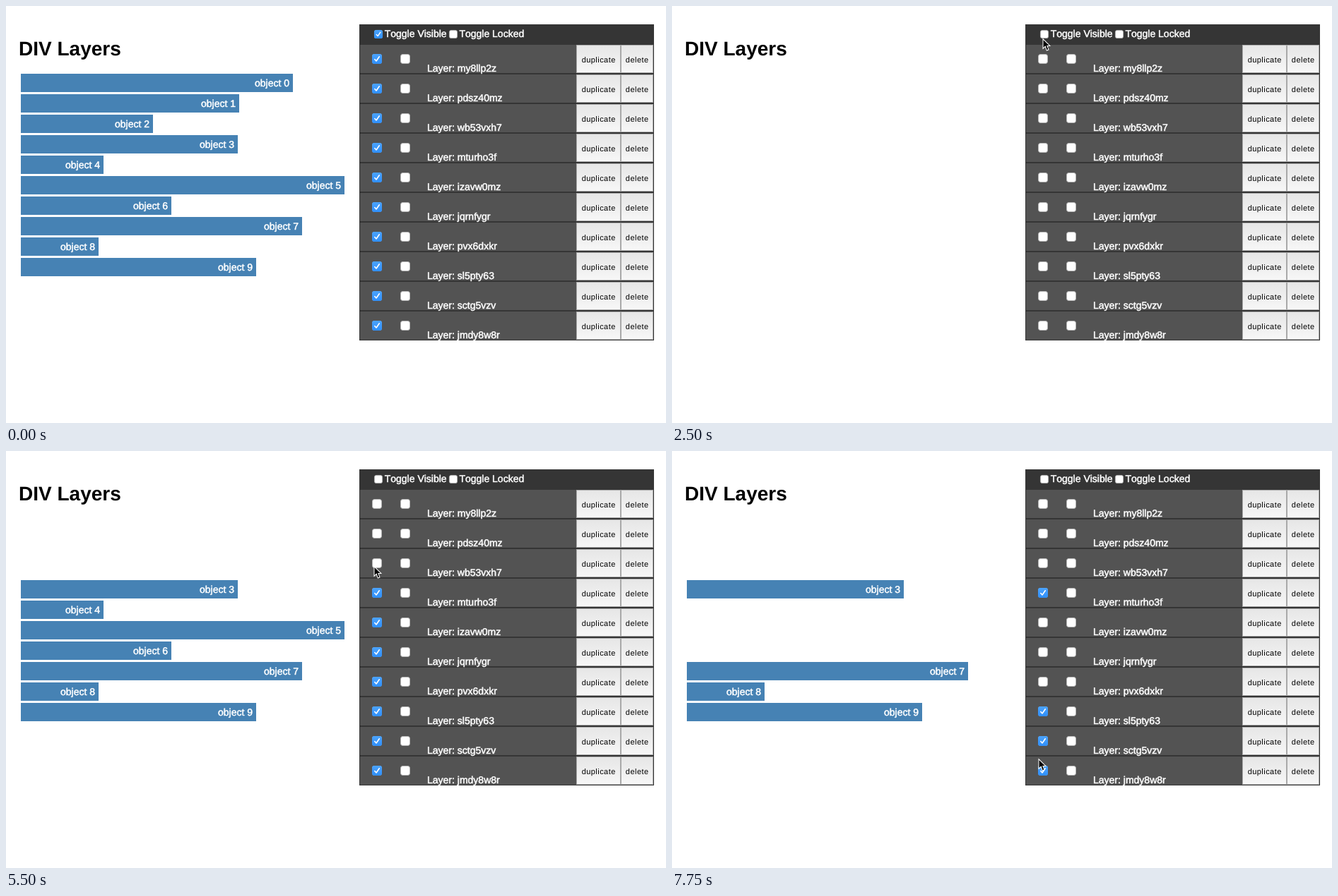
Recreate the animation shown at these times as an HTML page. Size 934 by 591 pixels, loop 8 s.

```html
<!DOCTYPE html>
<html lang="en">
<head>
<meta charset="utf-8">
<title>DIV Layers</title>
<style>
  html, body { margin: 0; width: 100%; height: 100%; overflow: hidden; background: #fff; }
  svg { display: block; }
  text {
    font: 14px "Liberation Sans", Arial, sans-serif;
    font-kerning: none;
    text-rendering: geometricPrecision;
    white-space: pre;
  }
  .title { font-size: 28px; font-weight: bold; }
  .light { fill: #fff; stroke: #fff; stroke-width: .5px; }
  .label { font-size: 11px; letter-spacing: .45px; }
</style>
</head>
<body>
<svg id="stage" width="934" height="591" viewBox="0 0 934 591">
  <defs>
    <linearGradient id="face" x1="0" y1="0" x2="0" y2="1">
      <stop offset="0" stop-color="#e6e6e6"/>
      <stop offset="1" stop-color="#f7f7f7"/>
    </linearGradient>
    <linearGradient id="blue" x1="0" y1="0" x2="0" y2="1">
      <stop offset="0" stop-color="#4ba3fb"/>
      <stop offset="1" stop-color="#2f8ffb"/>
    </linearGradient>
    <linearGradient id="pressed" x1="0" y1="0" x2="0" y2="1">
      <stop offset="0" stop-color="#2083f6"/>
      <stop offset="1" stop-color="#0464e6"/>
    </linearGradient>
  </defs>
</svg>
<script>
const STEP = 250, STEPS = 32;
const layers = ["my8llp2z", "pdsz40mz", "wb53vxh7", "mturho3f", "izavw0mz",
  "jqrnfygr", "pvx6dxkr", "sl5pty63", "sctg5vzv", "jmdy8w8r"];
const barEnds = [406, 330, 208, 328, 138, 479, 234, 419, 131, 354];

// all times below are in steps
const blankFrom = 10, blankTo = 14, pressAt = 20;
const offAt = { 0: 21, 1: 21, 2: 22, 4: 25, 5: 26, 6: 28 };

// pointer strokes: start, end, first point, last point; it rests between them
const strokes = [
  [1, 2, [520, 440], [422, 470]],
  [5, 7, [478, 287], [531, 54]],
  [8, 9, [525, 45], [524, 45]],
  [15, 17, [524, 47], [519, 79]],
  [20, 22, [519, 94], [520, 162]],
  [23, 25, [502, 173], [519, 244]],
  [26, 29, [522, 276], [522, 320]],
  [31, 32, [518, 435], [518, 435]]
];

const stage = document.getElementById("stage");

function add(tag, attrs, parent = stage) {
  const el = document.createElementNS("http://www.w3.org/2000/svg", tag);
  for (const key in attrs) el.setAttribute(key, attrs[key]);
  return parent.appendChild(el);
}

function rect(x, y, width, height, fill, parent) {
  return add("rect", { x, y, width, height, fill }, parent);
}

function write(str, x, y, cls, anchor = "start", parent = stage) {
  const el = add("text", { x, y, class: cls, "text-anchor": anchor }, parent);
  el.textContent = str;
}

function checkbox(cx, cy, size) {
  const g = add("g", { transform: `translate(${cx} ${cy}) scale(${size / 14})` });
  add("rect", { x: -6.5, y: -6.5, width: 13, height: 13, rx: 3,
    fill: "#fff", stroke: "#b4b4b4" }, g);
  const on = add("g", { visibility: "hidden" }, g);
  const face = add("rect", { x: -7, y: -7, width: 14, height: 14, rx: 3,
    fill: "url(#blue)" }, on);
  add("path", { d: "M-3.2 .5L-1 3L3.3 -3.2", fill: "none", stroke: "#fff",
    "stroke-width": 1.6, "stroke-linecap": "round", "stroke-linejoin": "round" }, on);
  return { on, face };
}

function button(str, x, y, width) {
  add("rect", { x: x + .5, y: y + .5, width: width - 1, height: 39,
    fill: "url(#face)", stroke: "#a9a9a9" });
  write(str, x + width / 2 + .2, y + 25, "label", "middle");
}

function show(el, on) {
  el.setAttribute("visibility", on ? "visible" : "hidden");
}

write("DIV Layers", 18, 70, "title");

const bars = barEnds.map((end, i) => {
  const g = add("g", {}), y = 96 + 29 * i;
  rect(21, y, end - 21, 26, "steelblue", g);
  write("object " + i, end - 5, y + 18, "light", "end", g);
  return g;
});

rect(500, 26, 417, 448, "#353535");
const master = checkbox(527, 40, 12);
write("Toggle Visible", 535.7, 44, "light");
checkbox(633, 40, 12);
write("Toggle Locked", 641.4, 44, "light");

const boxes = layers.map((name, i) => {
  const y = 55 + 42 * i;
  rect(501, y, 306, 40, "#535353");
  const box = checkbox(525, y + 20, 14);
  checkbox(565, y + 20, 14);
  write("Layer: " + name, 596, y + 37.5, "light");
  button("duplicate", 807, y, 63);
  button("delete", 870, y, 46);
  return box;
});

const pointer = add("g", {});
add("path", { fill: "#fff",
  d: "M0 0V16L3.4 12.7L5.5 18.2L9.1 16.7L7 11.6H11.6Z" }, pointer);
add("path", { fill: "#000",
  d: "M1 2.4V13.6L4 10.7L5.9 16.8L7.8 16L5.6 10.6H9.2Z" }, pointer);

function pointerAt(step) {
  const stroke = strokes.filter(s => s[0] <= step).pop();
  if (!stroke) return null;
  const [start, end, a, b] = stroke;
  const p = Math.min(1, (step - start) / (end - start));
  const eased = p * (2 - p);
  return a.map((v, k) => Math.round(v + (b[k] - v) * eased));
}

function draw(step) {
  const blank = step >= blankFrom && step < blankTo;
  const isOn = i => !blank && step < (offAt[i] ?? STEPS);
  boxes.forEach((box, i) => {
    show(box.on, isOn(i));
    show(bars[i], isOn(i));
  });
  show(master.on, isOn(0));
  boxes[0].face.setAttribute("fill", step === pressAt ? "url(#pressed)" : "url(#blue)");

  const spot = pointerAt(step);
  show(pointer, spot);
  if (spot) pointer.setAttribute("transform", `translate(${spot[0] + .5} ${spot[1] + .5})`);
}

const start = performance.now();
function tick(now) {
  draw(Math.floor(Math.max(0, now - start) / STEP) % STEPS);
  requestAnimationFrame(tick);
}
draw(0);
requestAnimationFrame(tick);
</script>
</body>
</html>
```
